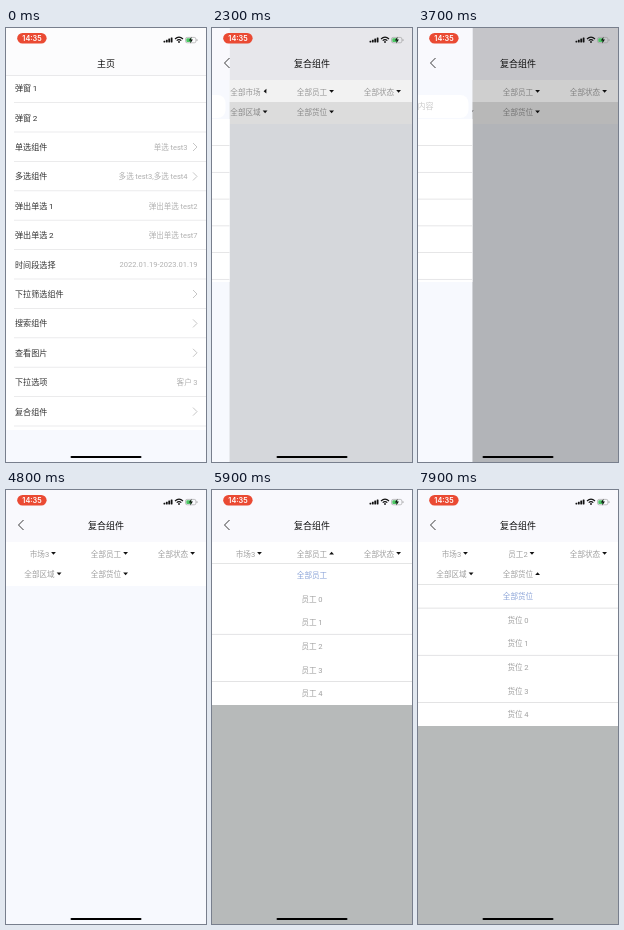
Write an HTML page that moves like this. It is 200 by 434 pixels and loops after 8000 ms.

```html
<!DOCTYPE html>
<html lang="zh-CN">
<head>
<meta charset="utf-8">
<style>
html, body { margin: 0; width: 100%; height: 100%; overflow: hidden; background: #fff; }
svg { display: block; font-family: Roboto, "Noto Sans CJK SC", "Noto Sans CJK", "Noto Sans CJK JP", sans-serif; }
.clock { font-family: Inter, sans-serif; }
</style>
</head>
<body>
<script>
const LOOP = 8000, BG = '#f7f9fe', BLUE = '#8da5d8', GREY = '#a0a0a0';

function el(parent, tag, attrs = {}) {
  const node = document.createElementNS('http://www.w3.org/2000/svg', tag);
  set(node, attrs);
  parent.append(node);
  return node;
}
function set(node, attrs) {
  for (const k in attrs) node.setAttribute(k, attrs[k]);
}
const rect = (p, x, y, width, height, fill, rx = 0) => el(p, 'rect', { x, y, width, height, fill, rx });
const path = (p, d, stroke, width = 0.8) => el(p, 'path', { d, stroke, fill: 'none', 'stroke-width': width });
const rule = (p, x1, x2, y, color) => rect(p, x1, y - 0.4, x2 - x1, 0.8, color);

// y is the vertical centre of the glyphs; Han and Latin get a thin space between them
function text(p, str, x, y, size, fill, anchor = 'start', weight = 400) {
  const node = el(p, 'text', { x, y: y + size * 0.37, 'font-size': size, fill, 'text-anchor': anchor, 'font-weight': weight });
  node.textContent = str.replace(/([\u4e00-\u9fff])(?=[a-z\d])/g, '$1\u2009');
  return node;
}

const stage = el(document.body, 'svg', { width: 200, height: 434, viewBox: '0 0 200 434' });

// Home page
const home = el(stage, 'g');
rect(home, 0, 0, 200, 434, BG);
rect(home, 0, 0, 200, 402, '#fff');
rect(home, 0, 0, 200, 47, '#fcfcfd');
rule(home, 0, 200, 47.4, '#e4e4e6');
text(home, '主页', 100, 35.5, 9, '#111', 'middle', 500);
[
  ['弹窗1'], ['弹窗2'], ['单选组件', '单选test3', 1], ['多选组件', '多选test3,多选test4', 1],
  ['弹出单选1', '弹出单选test2'], ['弹出单选2', '弹出单选test7'],
  ['时间段选择', '2022.01.19-2023.01.19'], ['下拉筛选组件', '', 1], ['搜索组件', '', 1],
  ['查看图片', '', 1], ['下拉选项', '客户3'], ['复合组件', '', 1]
].forEach(([label, value, arrow], i) => {
  const y = 60.2 + i * 29.4;
  text(home, label, 9, y, 8.1, '#333');
  if (value) text(home, value, arrow ? 181.5 : 191.5, y, 7.55, '#b0b0b0', 'end');
  if (arrow) path(home, `M187 ${y - 4}l4 4l-4 4`, '#b8b8b8');
  rule(home, 8, 200, y + 14.4, '#e6e6e8');
});

// Filter page
const page = el(stage, 'g');
rect(page, 0, 0, 200, 434, BG);
rect(page, 0, 0, 200, 52, '#f9f9fd');
rect(page, 0, 52, 200, 44, '#fff');

function filter(label, x, y) {
  const name = text(page, label, x, y, 7.6, GREY, 'middle');
  const arrow = el(page, 'path', { d: 'M-2.4-1.3H2.4L0 1.5Z', fill: '#111' });
  return (str, turn) => {
    name.textContent = str;
    const half = str.length > 3 ? 15.4 : 9.8;
    set(arrow, { transform: `translate(${x + half + 4.2} ${y - 0.8}) rotate(${180 * turn})` });
  };
}
const market = filter('全部市场', 33.5, 64);
const staff = filter('全部员工', 100, 64);
const state = filter('全部状态', 167, 64);
const area = filter('全部区域', 33.5, 84.5);
const slot = filter('全部货位', 100, 84.5);
state('全部状态', 0);
area('全部区域', 0);

function dropdown(word, top, lines) {
  const step = 23.6, full = step * 6;
  const shade = rect(page, 0, top, 200, 434 - top, '#b7baba');
  const panel = el(page, 'svg', { y: top, width: 200 });
  rect(panel, 0, 0, 200, full, '#fff');
  for (let i = 0; i < 6; i++)
    text(panel, i ? word + (i - 1) : '全部' + word, 100, (i + 0.5) * step, 7.6, i ? GREY : BLUE, 'middle');
  lines.forEach(n => rule(panel, 0, 200, n * step, '#dcdcde'));
  return p => {
    set(shade, { opacity: p });
    set(panel, { height: full * p, visibility: p ? 'visible' : 'hidden' });
  };
}
const staffList = dropdown('员工', 73.5, [3, 5]);
const slotList = dropdown('货位', 94.5, [1, 3, 5]);

// Dimming: the header and first filter row darken less than the body
const shades = [[0, 52, 30, 0.42], [52, 22, 45, 0.38], [74, 360, 0, 0.56]].map(([y, h, delay, depth]) =>
  ({ node: rect(page, 0, y, 200, h, '#000'), delay, depth }));

const drawer = el(page, 'g');
rect(drawer, 0, 0, 110, 434, BG);
rect(drawer, 0, 0, 110, 52, '#f9f9fd');
rect(drawer, 5, 67, 101, 23, '#fff', 8);
text(drawer, '输入内容', 55, 78.5, 8.1, '#ccc', 'middle');
rect(drawer, 0, 91, 110, 163, '#fff');
for (let i = 0; i < 6; i++) {
  const y = 104.3 + i * 26.75;
  text(drawer, i ? '市场' + (i - 1) : '全部市场', 9, y, 8.1, i ? '#444' : BLUE);
  rule(drawer, 9, 110, y + 13.3, '#e0e0e2');
}
path(page, 'M17.5 30l-5 5l5 5', '#222', 0.9);
text(page, '复合组件', 100, 35.5, 9, '#111', 'middle', 500);

// Status bar and home indicator
rect(stage, 11.2, 5, 29.4, 10.6, '#ea4a33', 5.3);
set(text(stage, '14:35', 26, 10.3, 7.3, '#fff', 'middle', 600), { class: 'clock' });
for (let i = 0; i < 4; i++) rect(stage, 157.5 + i * 2.4, 12.8 - i * 1.1, 1.8, 1.7 + i * 1.1, '#111', 0.4);
path(stage, 'M169 11q4-3.6 8 0M170.7 12.6q2.3-2 4.6 0', '#111', 1.2);
el(stage, 'circle', { cx: 173, cy: 14, r: 0.9, fill: '#111' });
set(rect(stage, 179.5, 9.4, 10.4, 5.4, 'none', 1.6), { stroke: '#999', 'stroke-width': 0.6 });
rect(stage, 180.3, 10.2, 5.2, 3.8, '#4cc764', 0.8);
rect(stage, 190.6, 11.2, 0.8, 1.8, '#999');
el(stage, 'path', { d: 'M185.6 8.8l-2.8 3.8h1.9l-.6 2.8l2.9-3.8h-2z', fill: '#111' });
rect(stage, 64.5, 428, 71, 2, '#000', 1);

const ramp = (t, start, length) => Math.min(1, Math.max(0, (t - start) / length));
const span = (t, open, close, length) => ramp(t, open, length) - ramp(t, close, length);
const ease = u => u < 0.5 ? 2 * u * u : 1 - 2 * (1 - u) ** 2;

function draw(t) {
  const push = 1 - (1 - ramp(t, 1100, 380)) ** 3;
  set(home, { transform: `translate(${-60 * push} 0)` });
  set(page, { transform: `translate(${200 * (1 - push)} 0)`, visibility: push ? 'visible' : 'hidden' });

  const open = ease(span(t, 2188, 3500, 400));
  set(drawer, { transform: `translate(${110 * (open - 1)} 0)` });
  shades.forEach(s => set(s.node, { opacity: s.depth * span(t, 2203 + s.delay, 3500, 400) }));
  market(t < 3500 ? '全部市场' : '市场3', span(t, 2200, 3500, 200));

  const staffOpen = span(t, 5000, 6000, 300);
  staffList(staffOpen);
  staff(t < 6000 ? '全部员工' : '员工2', staffOpen);

  const slotOpen = ramp(t, 6483, 300);
  slotList(slotOpen);
  slot('全部货位', slotOpen);
}

function tick() {
  draw(performance.now() % LOOP);
  requestAnimationFrame(tick);
}
tick();
</script>
</body>
</html>
```
